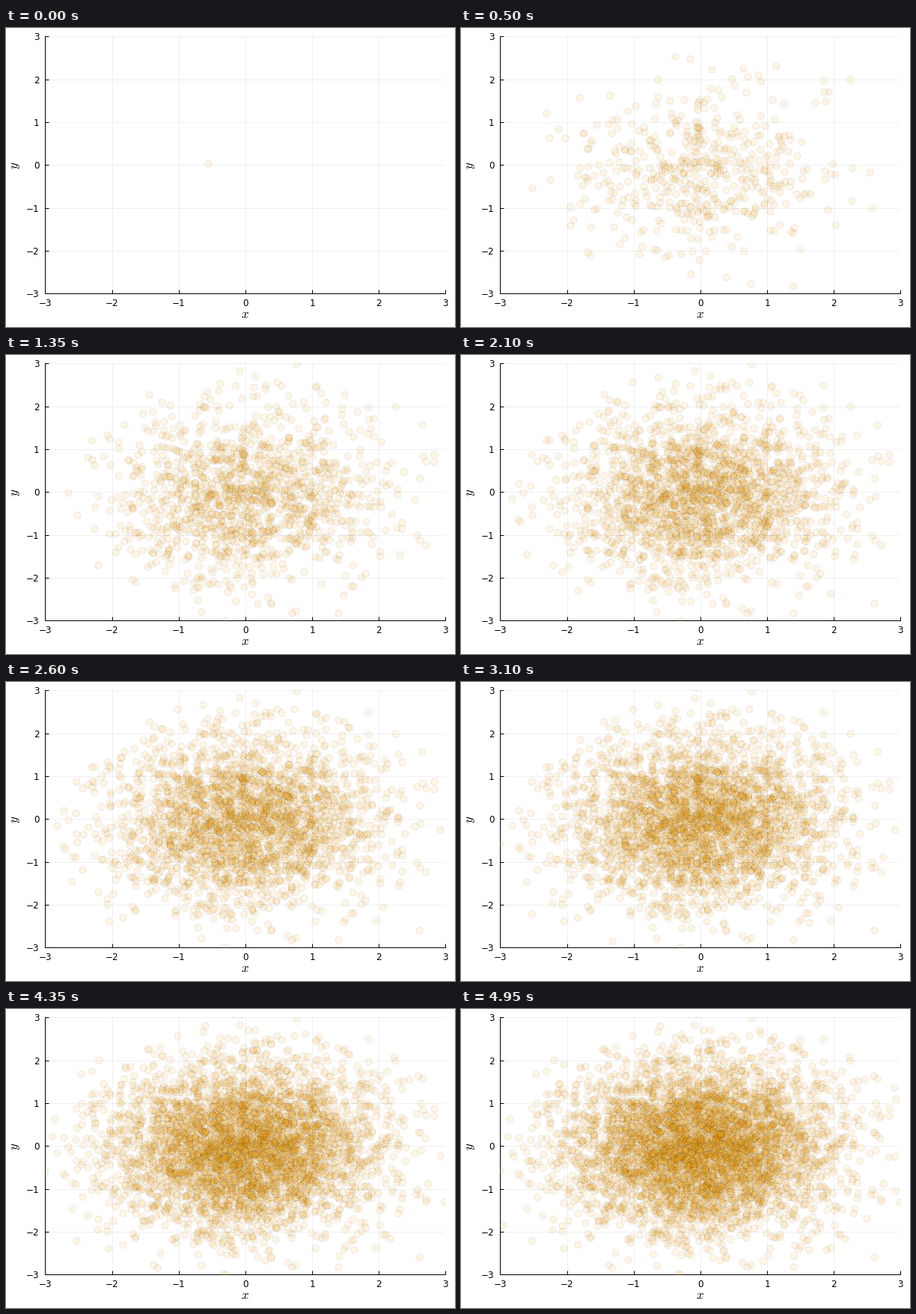
Recreate the animation shown at these times as a matplotlib script. Size 600x400 px, loop 5000 ms.

```python
import numpy as np
import matplotlib.pyplot as plt
from matplotlib.animation import FuncAnimation

W, H = 600, 400
LEFT, RIGHT, TOP, BOTTOM = 52.4, 587.4, 11.4, 355.4
FRAMES, STEP = 100, 50
PX = 0.72  # points per pixel at 100 dpi
FIRST = (-0.555, 0.045)

plt.rcParams["font.family"] = "DejaVu Sans"
plt.rcParams["mathtext.fontset"] = "cm"


def make_axes(fig):
    ax = fig.add_axes([LEFT / W, 1 - BOTTOM / H, (RIGHT - LEFT) / W, (BOTTOM - TOP) / H])
    ax.set(xlim=(-3, 3), ylim=(-3, 3), xticks=range(-3, 4), yticks=range(-3, 4))
    ax.set_axisbelow(True)
    ax.grid(color="black", alpha=0.06, linewidth=PX)
    ax.tick_params(direction="in", length=5 * PX, width=PX, labelsize=12 * PX)
    ax.tick_params(axis="x", pad=6.5 * PX)
    ax.tick_params(axis="y", pad=8 * PX)
    for side, spine in ax.spines.items():
        spine.set_visible(side in ("left", "bottom"))
        spine.set(linewidth=PX, zorder=1)
    return ax


def add_label(fig, x, y, text, rotation=0):
    fig.text(x / W, 1 - y / H, text, rotation=rotation,
             fontsize=17 * PX, ha="center", va="center")


fig = plt.figure(figsize=(W / 100, H / 100), dpi=100, facecolor="white")
ax = make_axes(fig)
add_label(fig, 319.5, 383.5, "$x$")
add_label(fig, 12, 183.5, "$y$", rotation=90)

# Independent standard normal samples, revealed a batch at a time
samples = np.random.default_rng(7).normal(size=(1 + STEP * (FRAMES - 1), 2))
samples[0] = FIRST
dots, = ax.plot([], [], "o", markersize=9.3 * PX, markeredgewidth=PX,
                markerfacecolor=(1, 165 / 255, 0, 0.1),
                markeredgecolor=(0, 0, 0, 0.07), zorder=3)


def draw(i):
    dots.set_data(*samples[:1 + STEP * i].T)
    return dots,


anim = FuncAnimation(fig, draw, frames=FRAMES, interval=50, repeat=True, repeat_delay=0)
plt.show()
```
